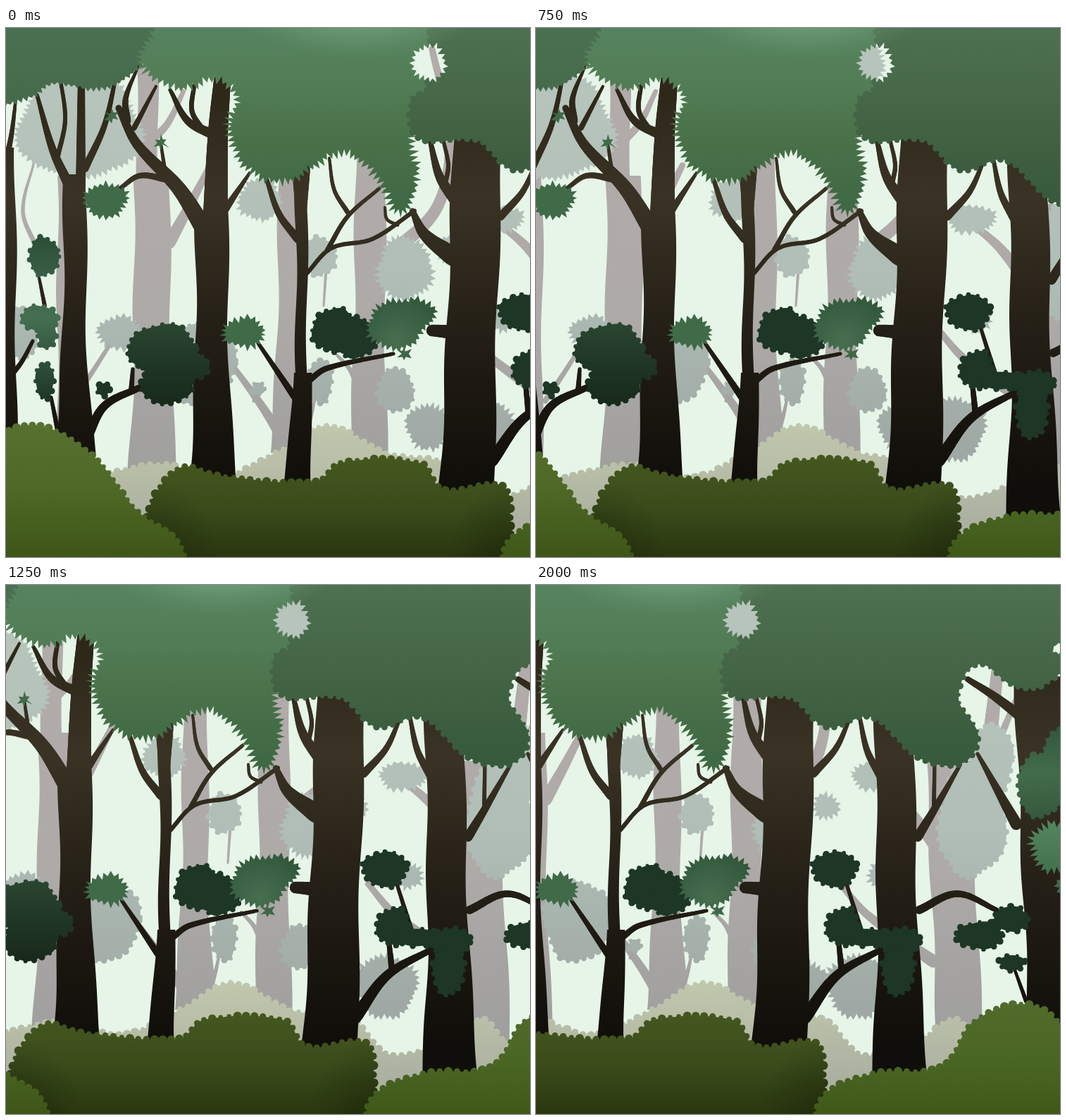
Recreate the animation shown at these times as an HTML page with a canvas. Size 744 by 752 pixels, loop 2250 ms.

```html
<!DOCTYPE html>
<html lang="en">
<head>
<meta charset="utf-8">
<title>Forest walk</title>
<style>
html, body { margin: 0; width: 100%; height: 100%; overflow: hidden; background: #e6f5e8; }
canvas { display: block; }
</style>
</head>
<body>
<canvas id="stage" width="744" height="752"></canvas>
<script>
const STEP = 4;
let g, wood, seed = 7;
const rnd = () => (seed = seed * 16807 % 2147483647) / 2147483647;

// Smooth open curve through flat x,y pairs, sampled about every STEP pixels.
function curve(p) {
  const n = p.length / 2, out = [];
  const at = i => {
    i = Math.max(0, Math.min(n - 1, i));
    return [p[2 * i], p[2 * i + 1]];
  };
  const dir = i => {
    const [a, b] = at(i - 1), [c, d] = at(i + 1), l = Math.hypot(c - a, d - b);
    return [(c - a) / l, (d - b) / l];
  };
  for (let i = 0; i < n - 1; i++) {
    const a = at(i), b = at(i + 1), u = dir(i), v = dir(i + 1);
    const len = Math.hypot(b[0] - a[0], b[1] - a[1]), k = Math.ceil(len / STEP);
    for (let j = 0; j < k; j++) {
      const t = j / k, t2 = t * t, t3 = t2 * t;
      out.push([0, 1].map(c => (2 * t3 - 3 * t2 + 1) * a[c] + (3 * t2 - 2 * t3) * b[c]
        + len * ((t3 - 2 * t2 + t) * u[c] + (t3 - t2) * v[c])));
    }
  }
  return [...out, at(n - 1)];
}

// Area between a curve and the horizontal line at y.
function edge(y, ...p) {
  const pts = curve(p);
  return [...pts, [pts.at(-1)[0], y], [pts[0][0], y]];
}

// Slightly uneven ellipse.
function oval(x, y, rx, ry = rx) {
  const n = 2 * Math.round(Math.PI * (rx + ry) / STEP / 2), turn = 6 * rnd();
  return Array.from({ length: n }, (_, i) => {
    const a = 2 * Math.PI * i / n, k = 1 + 0.05 * Math.sin(3 * a + turn) + 0.04 * Math.sin(5 * a - turn);
    return [x + rx * k * Math.cos(a), y + ry * k * Math.sin(a)];
  });
}

function fade(y0, y1, ...colors) {
  const f = g.createLinearGradient(0, y0, 0, y1);
  colors.forEach((c, i) => f.addColorStop(i / (colors.length - 1), c));
  return f;
}

function halo(x, y, r, inner, outer) {
  const f = g.createRadialGradient(x, y, 0, x, y, r);
  f.addColorStop(0, inner);
  f.addColorStop(1, outer);
  return f;
}

function poly(pts, fill) {
  g.fillStyle = fill;
  g.beginPath();
  pts.forEach(q => g.lineTo(...q));
  g.fill();
}

function bumpy(pts, fill, r = 5) {
  poly(pts, fill);
  pts.forEach(([x, y], i) => {
    if (i % 3) return;
    g.beginPath();
    g.arc(x, y, r * (0.6 + 0.7 * rnd()), 0, 7);
    g.fill();
  });
}

function spiky(pts, fill, size = 5) {
  const n = pts.length;
  poly(pts.map(([x, y], i) => {
    const [a, b] = pts[(i + n - 1) % n], [c, d] = pts[(i + 1) % n];
    const l = Math.hypot(c - a, d - b) || 1, k = (i % 2 ? 1 : -1) * size * (0.3 + rnd()) / l;
    return [x + (d - b) * k, y - (c - a) * k];
  }), fill);
}

const leaves = (kind, fill, ...ovals) => ovals.forEach(o => kind(oval(...o), fill, 4));

// Trunk leaning from x0 to x1, w wide, with a wider foot.
function trunk(x0, x1, y0, y1, w, foot = 0) {
  const left = [], right = [];
  for (let y = y0; y <= y1; y += STEP) {
    const t = (y - y0) / (y1 - y0), x = x0 + (x1 - x0) * t, h = w / 2 + foot * t ** 4;
    left.push([x - h + 2 * Math.sin(y / 35 + x0), y]);
    right.unshift([x + h + 2 * Math.sin(y / 40), y]);
  }
  poly([...left, ...right], wood);
}

// Limb tapering from width w0 to w1.
function limb(w0, w1, ...p) {
  const pts = curve(p);
  g.strokeStyle = wood;
  g.lineCap = 'round';
  for (let i = 1; i < pts.length; i++) {
    g.lineWidth = w0 + (w1 - w0) * i / pts.length;
    g.beginPath();
    g.moveTo(...pts[i - 1]);
    g.lineTo(...pts[i]);
    g.stroke();
  }
}

function layer(width, draw) {
  const c = document.createElement('canvas');
  c.width = width;
  c.height = 752;
  g = c.getContext('2d');
  draw();
  return c;
}

function drawBack() {
  wood = fade(150, 640, '#b1abaa', '#aeaaa8', '#9f9f9e');
  const leaf = fade(100, 600, '#b6c4bb', '#b0beb7', '#9fa8a4');

  trunk(82, 82, 210, 640, 18);
  trunk(200, 202, 40, 230, 30);
  trunk(207, 208, 210, 650, 51, 10);
  trunk(405, 404, 160, 605, 36, 12);
  trunk(518, 515, 150, 605, 43, 5);
  trunk(804, 820, 250, 655, 64);

  limb(18, 8, 232, 305, 262, 250, 290, 195);
  limb(12, 6, 207, 160, 230, 135, 252, 90);
  limb(7, 3, 42, 310, 24, 260, 40, 190);
  limb(8, 5, 95, 530, 122, 490, 160, 430);
  limb(15, 7, 396, 590, 365, 540, 318, 475);
  limb(5, 4, 352, 530, 358, 513);
  limb(9, 3, 420, 590, 432, 555, 440, 520);
  limb(9, 4, 500, 510, 488, 485, 470, 465);
  limb(20, 9, 535, 330, 612, 255, 630, 150, 605, 30);
  limb(4, 3, 454, 350, 451, 395);
  limb(19, 8, 785, 370, 740, 312, 690, 270);
  limb(18, 8, 782, 535, 690, 470, 650, 425);
  limb(22, 16, 860, 240, 875, 105);
  limb(10, 7, 880, 210, 905, 150);

  leaves(spiky, leaf, [105, 140, 88, 75], [520, 50, 55, 40], [360, 244, 30, 30], [566, 342, 39, 45],
    [160, 433, 30, 23], [600, 567, 32, 32], [675, 570, 45, 44], [700, 272, 34, 20], [630, 315, 18], [708, 413, 19]);
  leaves(bumpy, leaf, [446, 325, 22, 27], [24, 435, 20, 35], [358, 513, 9], [446, 503, 17, 30], [553, 515, 25, 30],
    [277, 477, 48, 56], [865, 250, 30, 52], [837, 335, 47, 80]);

  bumpy(edge(790, 100, 645, 220, 620, 300, 640, 390, 600, 455, 566, 540, 604, 630, 620, 682, 668,
    770, 642, 812, 617, 850, 652, 980, 652), fade(560, 700, '#c0c8ad', '#b8bda7', '#abb0a2'));
}

function drawTrees() {
  wood = fade(100, 650, '#2e281a', '#3a3325', '#2a241a', '#1c1811', '#100e0a');

  trunk(-2, 0, 170, 590, 30);
  limb(9, 4, 0, 190, 8, 150, 14, 100);
  limb(8, 5, 2, 500, 22, 475, 38, 445);

  trunk(98, 97, 208, 610, 32, 14);
  limb(15, 5, 90, 225, 66, 172, 44, 95);
  limb(7, 5, 73, 185, 84, 130, 76, 65);
  limb(14, 10, 106, 225, 107, 75);
  limb(11, 5, 112, 200, 140, 138, 157, 65);
  limb(14, 9, 114, 585, 140, 537, 190, 511);
  limb(8, 5, 178, 515, 180, 485);
  limb(4, 6, 47, 355, 55, 395);
  limb(5, 7, 64, 525, 74, 575);

  trunk(292, 293, 262, 650, 46, 12);
  limb(36, 24, 297, 280, 301, 150, 307, 75);
  limb(26, 9, 283, 288, 245, 228, 186, 165, 160, 114);
  limb(11, 3, 172, 132, 170, 100, 188, 54);
  limb(8, 4, 182, 142, 213, 83);
  limb(10, 6, 228, 215, 190, 210, 163, 227);
  limb(6, 4, 226, 205, 220, 165);
  limb(15, 5, 295, 152, 258, 132, 233, 88);
  limb(8, 6, 278, 143, 264, 118, 267, 82);
  limb(11, 4, 310, 260, 346, 206);

  trunk(419, 420, 200, 510, 16);
  trunk(421, 414, 490, 655, 28, 6);
  limb(26, 14, 419, 200, 419, 270);
  limb(12, 6, 414, 300, 388, 265, 370, 215);
  limb(6, 6, 426, 350, 462, 313, 520, 300, 580, 260);
  limb(7, 5, 456, 316, 485, 268, 530, 228);
  limb(7, 4, 485, 262, 466, 230, 459, 185);
  limb(5, 4, 556, 280, 541, 272, 538, 255);
  limb(10, 5, 410, 525, 358, 448);
  limb(9, 5, 428, 503, 455, 484, 550, 463);

  trunk(670, 654, 150, 665, 70, 5);
  limb(16, 20, 605, 430, 632, 432);
  limb(7, 28, 577, 260, 594, 293, 635, 325);
  limb(18, 6, 642, 250, 616, 212, 602, 160);
  limb(7, 5, 624, 220, 628, 195, 621, 160);
  limb(12, 5, 702, 268, 734, 232, 754, 188);
  limb(18, 8, 690, 615, 735, 555, 802, 516);
  limb(9, 7, 742, 548, 738, 510);
  limb(5, 7, 749, 425, 770, 492);

  trunk(816, 825, 170, 700, 55, 13);
  limb(12, 5, 796, 270, 778, 235, 767, 185);
  limb(14, 5, 850, 358, 876, 315, 910, 256);
  limb(6, 5, 873, 315, 874, 250);
  limb(12, 7, 852, 462, 906, 439, 962, 462);

  trunk(1030, 1052, 130, 660, 86);
  limb(16, 8, 998, 188, 957, 157, 921, 134);
  limb(5, 17, 935, 240, 990, 340);
  limb(4, 6, 987, 545, 1004, 592);
}

function drawCanopy() {
  spiky(edge(-40, -40, 120, 40, 97, 65, 80, 140, 86, 200, 45, 250, -30), fade(0, 110, '#4a7052', '#456a4b'), 3);
  spiky(edge(-40, 240, -30, 190, 45, 245, 87, 296, 74, 328, 98, 314, 140, 345, 203, 400, 217, 480, 178,
    530, 218, 560, 262, 584, 215, 580, 150, 640, 80, 640, -30),
    fade(0, 250, '#56835f', '#527c55', '#487049', '#3f6844'), 6);
  bumpy(edge(-40, 602, -30, 596, 88, 575, 102, 585, 156, 670, 160, 720, 202, 785, 188, 850, 245, 912, 254,
    936, 215, 908, 160, 935, 113, 985, 143, 1025, 144, 1080, 100), fade(0, 250, '#4e7152', '#47694a', '#3f6041', '#375a3c'), 4);

  // Light falling on the canopy, then the gaps in it.
  g.globalCompositeOperation = 'source-atop';
  g.save();
  g.translate(500, -25);
  g.scale(1, 0.4);
  g.fillStyle = halo(0, 0, 170, 'rgba(135,185,145,.7)', 'rgba(120,170,130,0)');
  g.fillRect(-170, -170, 340, 340);
  g.restore();
  g.globalCompositeOperation = 'destination-out';
  spiky(oval(600, 50, 23, 25), '#000', 4);
  spiky(oval(1050, 91, 8, 7), '#000', 2);
  g.globalCompositeOperation = 'source-over';
}

function drawLeaves() {
  const green = '#406a48', dark = '#1e3625', mid = fade(290, 530, '#2b4c36', '#466f52', dark);

  leaves(spiky, green, [150, 125, 8], [220, 163, 8], [142, 245, 31, 24], [338, 433, 30, 21], [1056, 428, 10, 12]);
  leaves(bumpy, mid, [54, 325, 21, 27], [47, 412, 26, 17], [58, 438, 13, 17], [55, 502, 13, 25]);
  leaves(bumpy, fade(415, 540, '#2b4732', '#203625', '#17281b'), [222, 456, 48, 34], [240, 480, 46, 25], [228, 503, 36, 32]);
  leaves(bumpy, dark, [138, 514, 9], [466, 430, 31, 31], [498, 440, 28, 29], [732, 404, 31, 25],
    [744, 486, 24, 26], [785, 501, 40, 12], [825, 508, 28, 20], [822, 548, 22, 34],
    [938, 498, 33, 19], [982, 475, 24, 18], [984, 537, 18, 11]);
  leaves(spiky, halo(555, 445, 70, '#466e4f', '#32573b'), [552, 422, 38, 35], [580, 407, 30, 22], [565, 463, 8]);
  leaves(bumpy, fade(200, 335, '#31573b', '#426b4b', '#34583c'), [1062, 240, 34, 38], [1025, 285, 33, 43]);
  spiky(oval(1048, 372, 37, 35), fade(335, 410, '#55865f', '#42704d'), 6);
}

function drawBushes() {
  bumpy(edge(790, 200, 695, 212, 662, 250, 624, 300, 636, 440, 645, 475, 618, 590, 619, 620, 656, 705, 651, 716, 700, 714, 790),
    fade(610, 752, '#45571f', '#3b4c1b', '#2a370f'));
  g.globalCompositeOperation = 'source-atop';
  for (const x of [195, 735]) {
    g.fillStyle = halo(x, 752, 110, 'rgba(18,26,6,.5)', 'rgba(18,26,6,0)');
    g.fillRect(x - 110, 642, 220, 110);
  }
  g.globalCompositeOperation = 'source-over';
  bumpy(edge(800, -40, 590, 45, 565, 125, 610, 185, 685, 243, 730, 262, 770), fade(560, 752, '#587030', '#4e6826', '#3e5517'));
  bumpy(edge(800, 705, 790, 714, 728, 790, 694, 885, 684, 930, 620, 1012, 597, 1080, 650), fade(595, 752, '#526a2b', '#4a6624', '#3f5818'));
}

const back = layer(970, drawBack);
const front = layer(1060, () => [drawTrees, drawCanopy, drawLeaves].forEach(f => f()));
const bushes = layer(1060, drawBushes);
const ctx = document.getElementById('stage').getContext('2d');
let shown = -1;

function frame(now) {
  const i = Math.floor(now % 2250 / 250);
  if (i !== shown) {
    shown = i;
    const x = i && -Math.round(38 * i + 3.5);
    ctx.filter = 'none';
    ctx.fillStyle = '#e6f5e8';
    ctx.fillRect(0, 0, 744, 752);
    ctx.filter = 'blur(0.6px)';
    ctx.drawImage(back, -Math.round(27.2 * i), 0);
    ctx.drawImage(front, x, 0);
    ctx.drawImage(bushes, x, 0);
  }
  requestAnimationFrame(frame);
}
frame(0);
</script>
</body>
</html>
```
